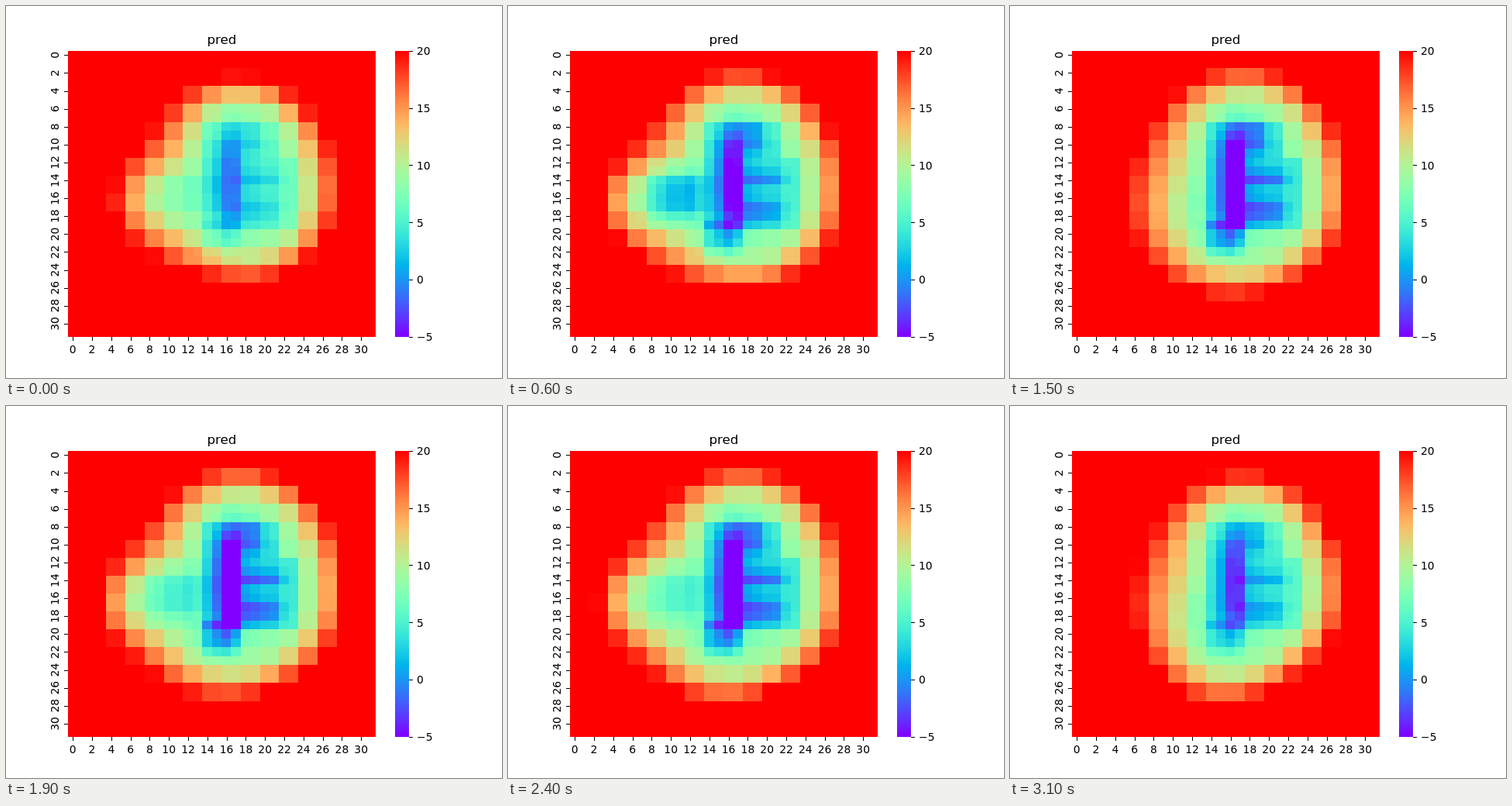
An HTML page with a canvas that plays this animation: 640x480 px, repeating every 3.2 s.

```html
<!DOCTYPE html>
<html lang="en">
<head>
<meta charset="utf-8">
<title>Heatmap</title>
<style>
  html, body { margin: 0; width: 100%; height: 100%; overflow: hidden; background: #fff; }
  canvas, svg { position: absolute; left: 0; top: 0; width: 640px; height: 480px; }
  text { font: 13.89px "DejaVu Sans", sans-serif; fill: #000; }
  .title { font-size: 16.67px; }
  .mid { text-anchor: middle; }
</style>
</head>
<body>
<canvas id="map" width="640" height="480"></canvas>
<svg id="axes" viewBox="0 0 640 480"></svg>
<script>
const LEFT = 80, TOP = 57.6, CELL_W = 12.4, CELL_H = 11.55, SIZE = 32;
const LOW = -5, HIGH = 20, BAR_X = 502, BAR_W = 18;
const LOOP = 3200, STEP = 100;
const { sin, cos, exp, min, max, round, floor, PI } = Math;
const clamp = (v, lo, hi) => min(hi, max(lo, v));

// The bowl gains strength, sags downwards and swells to the left in waves.
function poseAt(t) {
  const strength = min(1, t / 850, (3270 - t) / 430);
  const swell = clamp(0.6 + 0.8 * cos(2 * PI * (t - 370) / 1800), 0, 1.2);
  const chill = 11 * swell * strength * exp(-t / 1200);
  return { strength, swell, sag: t * 0.0004 - 0.45, blobs: coldSpots(strength, chill) };
}

// Soft boxes in cell units: centre, half sizes and depth.
function coldSpots(strength, chill) {
  const arm = 2 + 2.6 * strength;
  return [
    { x: 16.8, y: 14.2, w: 1.4, h: 6.2, d: 5 + 4 * strength },
    { x: 19, y: 9.5, w: 1.4, h: 2, d: arm },
    { x: 20, y: 14.4, w: 2.6, h: 0.9, d: arm },
    { x: 19.8, y: 18, w: 2.6, h: 1.4, d: arm },
    { x: 15.8, y: 21, w: 2, h: 1.9, d: 2 + 4.5 * strength },
    { x: 11, y: 16.3, w: 3, h: 2.6, d: chill }
  ];
}

// Distance from the middle, in 2x2 blocks, at which a level is met.
function reach(pose, angle, size, shift, tall, swell) {
  const off = angle - PI * 0.955;
  const bump = exp(-((Math.atan2(sin(off), cos(off)) / 0.49) ** 2));
  const droop = max(0, cos(angle - PI * 0.583)) ** 6;
  return size + shift * cos(angle) - tall * cos(2 * angle)
    - 0.14 * sin(2 * angle) + 0.17 * sin(3 * angle)
    - 0.4 * (1 - pose.strength) + pose.sag * droop + swell * pose.swell * bump;
}

function bowl(pose, col, row) {
  const dx = col - 8, dy = row - 7;
  const dist = Math.hypot(dx, dy), angle = Math.atan2(dy, dx);
  const inner = reach(pose, angle, 4, 0.85, 0.65, 2.3);   // level 10
  const outer = reach(pose, angle, 5.3, 0.45, 0.42, 1.65); // level 16
  if (dist < inner) return 5.5 + 4.5 * (dist / inner) ** 2;
  const slope = 6 / (outer - inner);
  return dist < outer ? 10 + slope * (dist - inner) : 16 + 1.2 * slope * (dist - outer);
}

function depth(pose, x, y) {
  const washed = y < 20 && (x >= 14 && x < 22 && y >= 8 || x >= 22 && x < 24 && y >= 12);
  return pose.blobs.reduce((sum, b) => {
    const u = (x + 0.5 - b.x) / b.w, v = (y + 0.5 - b.y) / b.h;
    return sum + b.d * exp(-(u ** 4) - v ** 4);
  }, washed ? 1.7 + 1.8 * pose.strength : 0);
}

function rainbow(value) {
  const p = clamp(floor((value - LOW) / (HIGH - LOW) * 256), 0, 255) / 255;
  const rgb = [Math.abs(2 * p - 0.5), sin(PI * p), cos(PI * p / 2)];
  return `rgb(${rgb.map(c => round(255 * clamp(c, 0, 1)))})`;
}

const ctx = document.getElementById("map").getContext("2d");
const edgeX = i => floor(LEFT + i * CELL_W);
const edgeY = i => floor(TOP + i * CELL_H);

function drawMap(pose) {
  ctx.fillStyle = rainbow(HIGH);
  ctx.fillRect(80, 58, 397, 369);
  for (let y = 0; y < SIZE; y++) {
    for (let x = 0; x < SIZE; x++) {
      const value = bowl(pose, x >> 1, y >> 1) - depth(pose, x, y);
      if (value >= HIGH) continue;
      ctx.fillStyle = rainbow(value);
      ctx.fillRect(edgeX(x), edgeY(y), edgeX(x + 1) - edgeX(x), edgeY(y + 1) - edgeY(y));
    }
  }
}

function drawAxes() {
  const parts = [];
  const label = (x, y, s, more = "") => parts.push(`<text x="${x}" y="${y}" ${more}>${s}</text>`);
  const tick = (x, y, w, h) => parts.push(`<rect x="${x}" y="${y}" width="${w}" height="${h}"/>`);

  label(278.4, 49, "pred", 'class="title mid"');
  for (let n = 0; n < SIZE; n += 2) {
    const x = LEFT + (n + 0.5) * CELL_W, y = TOP + (n + 0.5) * CELL_H;
    tick(round(x), 427, 1, 5);
    label(x, 448, n, 'class="mid"');
    tick(75, round(y), 5, 1);
    label(68, y, n, `class="mid" transform="rotate(-90 68 ${y})"`);
  }

  const height = SIZE * CELL_H, span = HIGH - LOW;
  for (let y = 58; y < 427; y++) {
    ctx.fillStyle = rainbow(HIGH - (y + 0.5 - TOP) / height * span);
    ctx.fillRect(BAR_X, y, BAR_W, 1);
  }
  for (let v = LOW; v <= HIGH; v += 5) {
    const y = TOP + (HIGH - v) / span * height;
    tick(BAR_X + BAR_W, round(y), 5, 1);
    label(530, round(y + 5.2), String(v).replace("-", "\u2212"));
  }
  document.getElementById("axes").innerHTML = parts.join("");
}

let shown = -1;
function frame() {
  let step = floor(performance.now() % LOOP / STEP);
  if (step === 11 || step === 27) step--; // two poses rest for a double beat
  if (step !== shown) {
    shown = step;
    drawMap(poseAt(step * STEP));
  }
  requestAnimationFrame(frame);
}

drawAxes();
frame();
</script>
</body>
</html>
```
